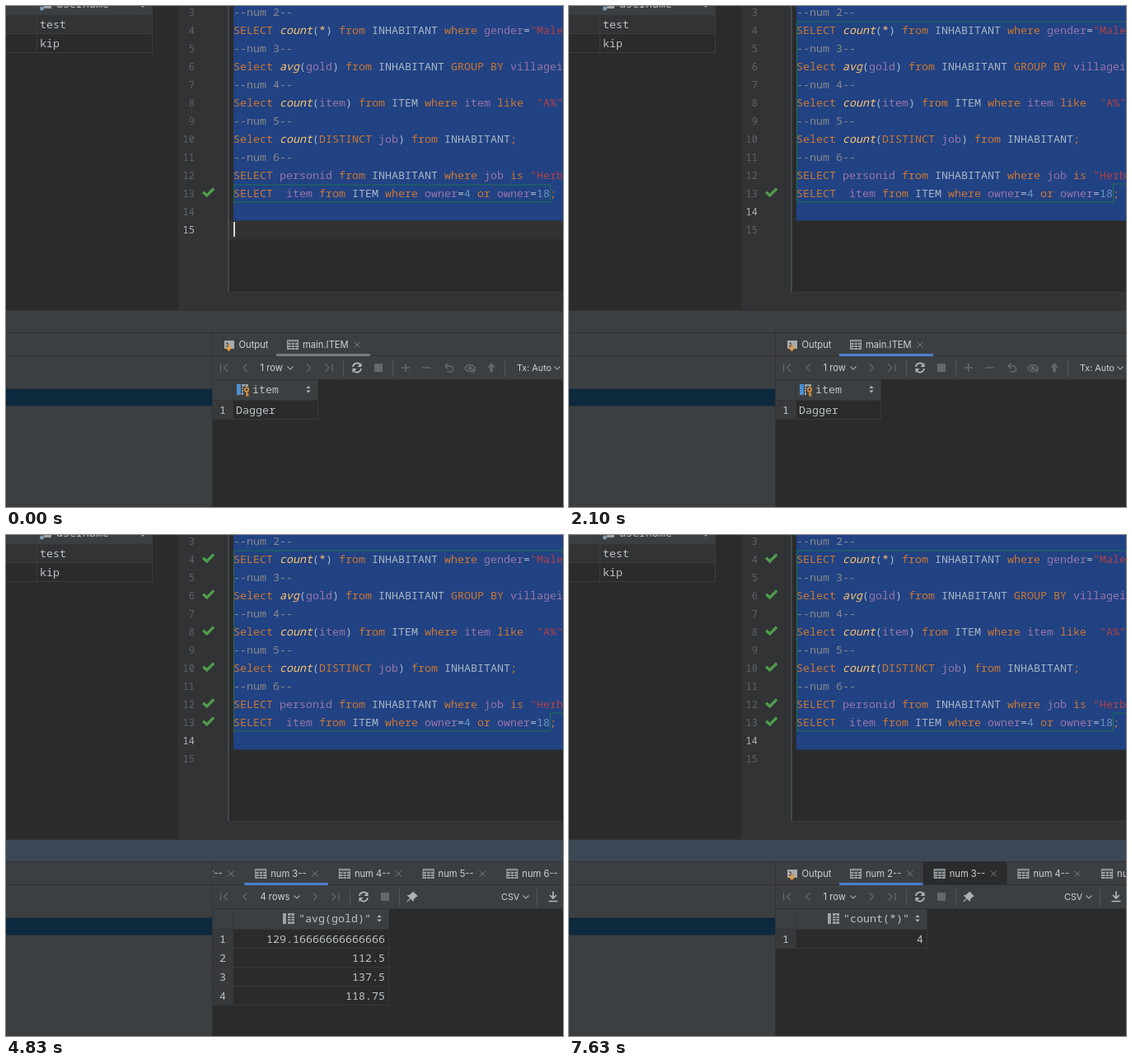
These frames come from a looping animation (676 by 608 pixels, 8 s). An HTML page:

```html
<!DOCTYPE html>
<html lang="en">
<head>
<meta charset="utf-8">
<title>SQL console</title>
<style>
html, body { margin: 0; width: 100%; height: 100%; overflow: hidden; background: #2b2b2b; }
svg { display: block; width: 676px; height: 608px; }
text { white-space: pre; }
.m { font: 500 13.333px "Noto Sans Mono", "DejaVu Sans Mono", monospace; fill: #a9b7c6; }
.n { font-size: 12px; font-weight: 400; fill: #606366; }
.u { font: 11.2px Inter, "DejaVu Sans", sans-serif; fill: #d0d2d4; }
.t { font-size: 10.8px; }
.p { font: 12.7px Inter, "DejaVu Sans", sans-serif; fill: #c3c5c7; }
.c { fill: #8a8a8a; } .s { fill: #b04246; } .k { fill: #cc7832; }
.f { fill: #ffc66d; font-style: italic; } .y { fill: #ffc66d; }
.i { fill: #9876aa; } .d { fill: #6897bb; }
.cell { fill: #bcc2c8; }
</style>
</head>
<body>
<svg id="stage" viewBox="0 0 676 608"></svg>
<script>
const LOOP = 8000, STEP = 70;
const GREY = '#aeb1b4', DIM = '#65686a', PANEL = '#3c3f41', DARK = '#2b2b2b';

const rect = (x, y, w, h, fill, more = '') =>
  `<rect x="${x}" y="${y}" width="${w}" height="${h}" fill="${fill}" ${more}/>`;
const line = (d, color = GREY, w = 1.3, more = '') =>
  `<path d="${d}" fill="none" stroke="${color}" stroke-width="${w}" ${more}/>`;
const text = (x, y, cls, s, more = '') => `<text x="${x}" y="${y}" class="${cls}" ${more}>${s}</text>`;
const group = (id, body, more = '') => `<g id="${id}" ${more}>${body}</g>`;
const END = 'text-anchor="end"';

/* ---------- editor ---------- */
const code = [
  '--num 2--',
  'SELECT count(*) from INHABITANT where gender="Male"',
  '--num 3--',
  'Select avg(gold) from INHABITANT GROUP BY villageid',
  '--num 4--',
  'Select count(item) from ITEM where item like  "A%"',
  '--num 5--',
  'Select count(DISTINCT job) from INHABITANT;',
  '--num 6--',
  'SELECT personid from INHABITANT where job is "Herbalist"',
  'SELECT  item from ITEM where owner=4 or owner=18;'
];
const tokens = new RegExp([
  /(?<c>--.*)/, /(?<s>"[^"]*")/,
  /(?<k>\b(?:SELECT|Select|from|where|GROUP BY|like|DISTINCT|or|is)\b|;)/,
  /(?<f>\b(?:count|avg)\b)/, /(?<y>\*)/,
  /(?<i>\b(?:gender|gold|villageid|item|job|personid|owner)\b)/, /(?<d>\d+)/
].map(r => r.source).join('|'), 'g');
const paint = s => s.replace(tokens, (...a) => {
  const hit = Object.entries(a[a.length - 1]).find(e => e[1] !== undefined);
  return `<tspan class="${hit[0]}">${hit[1]}</tspan>`;
});
const rowY = n => 34 + 22 * (n - 4);
const checked = [4, 6, 8, 10, 12, 13];

function editor() {
  let s = rect(0, 0, 676, 370, DARK);
  s += rect(0, 0, 178, 10, PANEL) + rect(0, 11, 178, 23, '#313335');
  s += line('M0 10.5H178M0 33.5H178M0 56.5H178M177.5 0V56M37.5 0V56', '#3b3d3f', 1);
  s += rect(46, 0, 9, 3, '#9fa2a5') + '<circle cx="43.500" cy="3" r="2.500" fill="#7d9db5"/>';
  s += text(61, 2, 'm cell', 'username') + line('M163.500 -2l2.500 3l2.500 -3');
  s += text(41, 27, 'm cell', 'test') + text(41, 50, 'm cell', 'kip');
  s += rect(209, 0, 61, 347, '#313335') + rect(209, 347, 467, 22, '#313335');
  s += rect(270, 261, 406, 22, '#323232', 'id="caretRow"');
  s += line('M270 347.500H676', '#393b3d', 1) + line('M270 0V347', '#5f6264', 1);
  s += rect(276, 0, 400, 260.5, '#214283');
  for (let n = 3; n <= 15; n++) s += text(229, rowY(n) - .5, 'm n', n, `${END} id="num${n}"`);
  code.forEach((c, i) => s += text(276, rowY(i + 3), 'm', paint(c)));
  s += line('M276.500 217H660.500V237.800H276.500Z', '#1d7350', 1, 'id="frameOne"');
  s += line('M276.500 19H690V216H660.500V237.800H276.500Z', '#1d7350', 1, 'id="frameAll"');
  checked.forEach(n => {
    const y = rowY(n) - 6.2;
    s += line(`M239.200 ${y}l4.500 4.200l8.500 -8.500`, '#4f9d4c', 3.3, `id="check${n}"`);
  });
  return s + rect(276, 240, 2, 18, '#d5d5d5', 'id="caret"');
}

/* ---------- small icons ---------- */
const tableIcon = (x, y) => rect(x, y, 14, 12, '#9da2a6') + rect(x + 1, y + 1, 12, 2, '#6c7478') +
  line(`M${x + 1} ${y + 3.5}h12M${x + 1} ${y + 6.5}h12M${x + 1} ${y + 9.5}h12M${x + 5} ${y + 3}v8.500M${x + 9.5} ${y + 3}v8.500`, '#3b4043', 1);
const down = (x, y) => line(`M${x - 3.5} ${y - 1.5}l3.500 3.500l3.500 -3.500`, '#a0a3a5', 1.2);
const cross = (x, y) => line(`M${x - 3.5} ${y - 3.5}l7 7m0 -7l-7 7`, '#7b7e80', 1);
const key = x => `<circle cx="${x}" cy="465.500" r="2.300" fill="${PANEL}" stroke="#e0953c" stroke-width="1.600"/>` +
  line(`M${x} 468v5.500M${x} 470.500h2.500M${x} 472.800h2.500`, '#e0953c', 1.5);
const columnIcon = (x, keyed) => rect(x, 459, keyed ? 5 : 4, 13, keyed ? '#4b8fd0' : '#9da2a6') +
  rect(x + 6, 459, 8, 13, '#9da2a6') + line(`M${x + 6} 462.500h8M${x + 6} 465.500h8M${x + 6} 468.500h8M${x + 10} 460v11`, PANEL, 1) +
  (keyed ? rect(x + 8, 462, 8, 11, PANEL) + key(x + 12) : '');
const sorter = x => `<path d="M${x - 2.6} 464l2.600 -3l2.600 3zM${x - 2.6} 466.500l2.600 3l2.600 -3z" fill="#b5b8ba"/>`;

/* ---------- result panel ---------- */
const TAB_W = 101.7;
const tabNames = ['Output', 'num 2--', 'num 3--', 'num 4--', 'num 5--', 'num 6--', 'main.ITEM'];
const tabW = i => i === 0 ? 77 : i === 6 ? 114 : TAB_W;

function tab(name, i) {
  const w = tabW(i);
  let s = rect(0, 397, w, 27, '#292b2c', `id="hover${i}"`);
  if (i) s += tableIcon(13, 405) + text(32, 415, 'u', name) + cross(w - 16, 411);
  else s += rect(14, 406, 12, 10, '#a7abae') + line('M16.500 408.500l3 2.500l-3 2.500', PANEL, 1.4) +
    line('M19.500 410v7m-3.500 -3l3.500 4l3.500 -4', '#e39a3b', 1.8) + text(31.5, 415, 'u', name);
  s += rect(0, 422, w, 3, '#747a80', `id="mark${i}"`);
  return group('tab' + i, s);
}

function pager(label, shift) {
  const x = shift;
  return line('M260.500 434.500v9m8.500 -9l-4.500 4.500l4.500 4.500M292.500 434.500l-4.500 4.500l4.500 4.500', DIM) +
    text(308.5, 443, 'u', label) + down(345 + x, 439) +
    line(`M${365 + x} 434.500l4.500 4.500l-4.500 4.500M${387.5 + x} 434.500l4.500 4.500l-4.500 4.500m8.500 -9v9`, DIM) +
    line(`M${409.5 + x} 430v20M${469.5 + x} 430v20`, '#55585a', 1) +
    line(`M${421 + x} 438a5 5 0 0 1 9 -2.500M${431 + x} 440a5 5 0 0 1 -9 2.500`, '#b4b7b9', 1.7) +
    `<path d="M${431.5 + x} 433v5h-5zM${420.5 + x} 445v-5h5z" fill="#b4b7b9"/>` +
    rect(447 + x, 434, 10, 10, DIM);
}
const pin = x => `<path d="M${x + 1} 432.500l6 6l-2 .5l-3 3l-.5 3l-3.500 -3.500l-4 4l-.8 -.8l4 -4l-3.500 -3.500l3 -.5l3.500 -3z" fill="#aeb1b4"/>`;
const exportBar = text(601, 443, 'u t', 'CSV') + down(631, 439) + line('M644.500 430v20', '#55585a', 1) +
  line('M664 432.500v8m-4 -3.500l4 4l4 -4M658.500 444.500h11', '#b4b7b9', 1.7);
const editBar = line('M480 439h10M485 434v10M505.500 439h10', DIM, 1.6) +
  line('M536.500 433.500l-3.500 3.500l3.500 3.500M533.500 437h5.500a3.500 3.500 0 0 1 0 7h-3.500', DIM, 1.6) +
  line('M556.500 439.500q6.500 -8 13 0q-6.500 8 -13 0', DIM, 1.5) + `<circle cx="563" cy="439.500" r="2.300" fill="${DIM}"/>` +
  line('M567.500 446v-5m-2.500 2l2.500 -2.500l2.500 2.500', DIM, 1.3) +
  `<path d="M589 433l5 5.500h-3.300v6h-3.400v-6h-3.300z" fill="${DIM}"/>` +
  line('M605.500 430v20', '#55585a', 1) + text(620, 443, 'u t', 'Tx: Auto') + down(669, 439);

function grid(right, head, rows, side) {
  const bottom = 478 + 23 * rows.length, w = right - 251;
  let s = rect(251, 454, w, 24, PANEL) + rect(251, 478, 24, bottom - 478, '#37393b') + head;
  let d = `M275.500 454V${bottom}M${right - .5} 454V${bottom}M251 478.500H${right}`;
  rows.forEach((v, i) => {
    const y = 495 + 23 * i;
    d += `M251 ${y + 6.5}H${right}`;
    s += text(259, y, 'm cell', i + 1) + (side ? text(right - 5, y, 'm cell', v, END) : text(279, y, 'm cell', v));
  });
  return s + line(d, '#34373a', 1);
}
const header = (icon, x, label, arrow, keyed) =>
  columnIcon(icon, keyed) + text(x, 470, 'm cell', label) + sorter(arrow);

const views = {
  item: pager('1 row', 0) + editBar + grid(379, header(280, 299, 'item', 367, true), ['Dagger']),
  avg: pager('4 rows', 8) + pin(493) + exportBar +
    grid(465, header(336, 355, '"avg(gold)"', 453), ['129.16666666666666', '112.5', '137.5', '118.75'], true),
  count: pager('1 row', 0) + pin(485) + exportBar + grid(435, header(314, 333, '"count(*)"', 423), ['4'], true)
};

function spinner() {
  let s = '';
  for (let i = 0; i < 12; i++)
    s += line('M0 -8V-13', '#777', 2.2, `stroke-linecap="round" opacity="${.2 + .3 * i / 11}" transform="rotate(${i * 30})"`);
  return group('spinner', s);
}

function panel() {
  return rect(0, 370, 676, 27, PANEL, 'id="title"') + rect(0, 397, 676, 57, PANEL) + rect(0, 425, 250, 183, PANEL) +
    rect(0, 464.5, 250, 21, '#0d293e') + rect(251, 454, 425, 154, DARK) +
    line('M0 369.500H676M0 396.500H676M0 424.500H676M250.500 397V608M251 453.500H676', '#303234', 1) +
    group('tabs', tabNames.map(tab).join(''), 'clip-path="url(#strip)"') +
    Object.keys(views).map(k => group(k, views[k])).join('') + spinner();
}

/* ---------- context menu ---------- */
const items = [
  [196, 'Show Context Actions', '⌥↩'], [226, 'Cut', '⌘X'], [247, 'Copy', '⌘C'], [268, 'Paste', '⌘V'],
  [289, 'Copy / Paste Special', '>'], [310, 'Column Selection Mode', '⇧⌘8'], [340, 'Find in Files'],
  [361, 'Refactor', '>'], [391, 'Folding', '>'], [421, 'Edit as Table'], [451, 'Search with Quarvo'],
  [481, 'Go To', '>'], [511, 'Evaluate Expression...', '⌥F8'], [541, 'Switch Session (console)'],
  [571, 'Explain Plan'], [592, 'Explain Plan (Raw)'], [613, 'Execute to File']
];
const branch = y => line(`M311 ${y}h3l5 -4.500M314 ${y}l5 4.500`, GREY, 1.4) + rect(309.5, y - 2, 4, 4, GREY) +
  rect(318, y - 7, 3.5, 3.5, GREY) + rect(318, y + 3, 3.5, 3.5, GREY);

function menu() {
  let s = rect(293, 182, 258, 440, '#000', 'rx="8" opacity=".1"') + rect(295, 180, 254, 440, '#000', 'rx="7" opacity=".14"');
  s += rect(296.5, 180.5, 251, 440, PANEL, 'rx="5" stroke="#505355"');
  s += rect(297, 0, 250, 21, '#4b6eaf', 'id="pick"');
  s += line([211, 325, 376, 406, 436, 466, 496, 526, 556].map(y => `M308 ${y + .5}H536`).join(''), '#56595b', 1);
  for (const [y, label, hint] of items) {
    s += text(329, y + 4.6, 'p', label);
    if (hint === '>') s += line(`M529 ${y - 4}l4 4l-4 4`, GREY, 1.4);
    else if (hint) s += text(536, y + 4.6, 'p', hint, END);
  }
  s += `<circle cx="316" cy="194" r="5.300" fill="${GREY}"/>` + rect(313.5, 198, 5, 2.5, GREY) + rect(314, 201.5, 4, 1.5, GREY);
  s += line('M310 221l10 8M310 231l10 -8', GREY, 1.5) +
    `<g fill="none" stroke="${GREY}" stroke-width="1.400"><circle cx="311.500" cy="221.500" r="2"/><circle cx="311.500" cy="230.500" r="2"/></g>`;
  s += line('M311 249V241H318', GREY, 1.6) + rect(313, 243, 9, 10, GREY) + line('M315 246.500h5M315 249.500h5', PANEL, 1);
  s += line('M311.500 263.500h9v10h-9z', GREY, 1.6) + rect(313.5, 262, 5, 3, GREY);
  s += tableIcon(309, 415) + rect(311, 505, 11, 12, GREY) + rect(312.5, 506.5, 8, 2.5, PANEL) +
    line('M313 511.500h7M313 514.500h7', PANEL, 1.4, 'stroke-dasharray="1.600 1.100"');
  return group('menu', s + branch(571) + branch(592) + branch(613));
}

const stage = document.getElementById('stage');
stage.innerHTML = '<defs><clipPath id="strip"><rect x="251" y="397" width="425" height="28"/></clipPath></defs>' +
  editor() + panel() + menu();

/* ---------- timeline ---------- */
const el = {};
stage.querySelectorAll('[id]').forEach(e => el[e.id] = e);
const show = (id, on) => el[id].style.display = on ? '' : 'none';
const set = (id, name, v) => el[id].setAttribute(name, v);
const ramp = (t, a, b) => {
  const p = Math.min(1, Math.max(0, (t - a) / (b - a)));
  return p * p * (3 - 2 * p);
};
const within = (t, a, b) => t >= a && t < b;

function render(now) {
  const t = Math.floor(now / STEP) * STEP;
  const clicked = t >= 490;

  // editor
  show('frameOne', !clicked);
  show('frameAll', clicked);
  show('caretRow', !clicked);
  el.num14.style.fill = clicked ? '#b0b2b4' : '';
  el.num15.style.fill = clicked ? '' : '#b0b2b4';
  set('caret', 'y', clicked ? 240 : 262);
  show('caret', !clicked || within(t, 2590, 3500) || within(t, 3990, 4410));
  checked.forEach((n, i) => show('check' + n, n === 13 || t >= 2170 + i * STEP));

  // menu
  show('menu', within(t, 490, 2100));
  let aim = 0;
  if (within(t, 840, 1120)) aim = 196 + 420 * ramp(t, 770, 1120);
  if (t >= 1820) aim = 613;
  const hit = items.find(i => Math.abs(i[0] - aim) <= 15);
  show('pick', hit);
  if (hit) set('pick', 'y', hit[0] - 10);

  // tabs
  const added = Math.min(5, Math.max(0, Math.floor((t - 2100) / STEP)));
  const scroll = 82 * ramp(t, 2450, 2590) + 107.7 * ramp(t, 3150, 3360) - 189.7 * ramp(t, 4760, 4970);
  const chosen = t < 4410 ? 6 : t < 5880 ? 2 : 1;
  let hover = -1;
  if (within(t, 3500, 4830)) hover = 2;
  else if (within(t, 4970, 5460)) hover = 0;
  else if (within(t, 5460, 6440)) hover = 1;
  else if (t >= 7560) hover = 2;
  const focused = within(t, 490, 2240) || t >= 4410;
  let x = 251 - scroll;
  tabNames.forEach((_, i) => {
    const on = i === 0 || i === 6 || i <= added;
    show('tab' + i, on);
    set('tab' + i, 'transform', `translate(${x.toFixed(2)} 0)`);
    show('hover' + i, i === hover);
    show('mark' + i, i === chosen);
    set('mark' + i, 'fill', focused ? '#4a7fd0' : '#747a80');
    if (on) x += tabW(i);
  });

  // results
  set('title', 'fill', t >= 4410 ? '#3c4855' : PANEL);
  show('item', chosen === 6);
  show('avg', chosen === 2);
  show('count', chosen === 1);
  show('spinner', within(t, 2730, 3220));
  set('spinner', 'transform', `translate(519 591) rotate(${t / STEP * 30})`);
}

const start = performance.now();
function tick() {
  render((performance.now() - start) % LOOP);
  requestAnimationFrame(tick);
}
tick();
</script>
</body>
</html>
```
